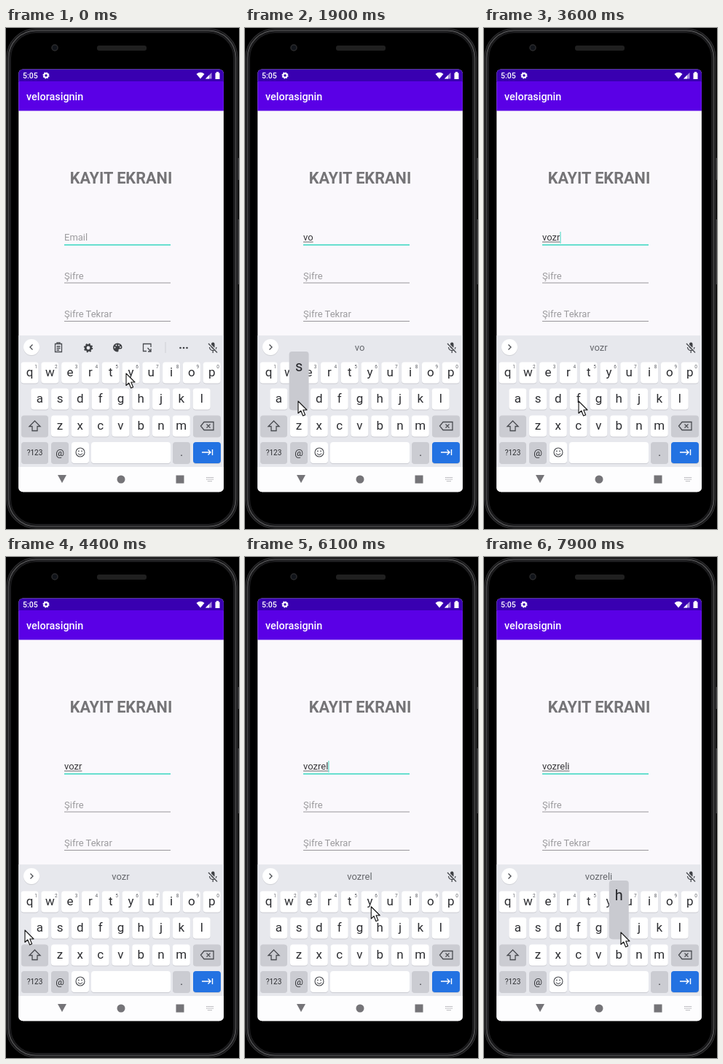
Recreate the animation shown at these times as an HTML page. Size 320 px wide and 686 px high, loop 8 s.

```html
<!DOCTYPE html>
<html lang="tr">
<head>
<meta charset="utf-8">
<title>Kayıt ekranı</title>
<style>
html, body { margin: 0; width: 100%; height: 100%; overflow: hidden; background: #000; }
svg { display: block; width: 100%; height: 100%; font-family: Roboto, "Noto Sans", sans-serif; }
.mid { text-anchor: middle; }
.hint { font-size: 13px; fill: #9c9b9e; }
.typed { font-size: 13px; fill: #38373a; }
.letter { font-size: 17px; fill: #2c2d31; }
.digit { font-size: 6.5px; fill: #606268; }
.offer { font-size: 13px; fill: #66686d; }
.line { fill: none; stroke: #4a4c51; stroke-width: 1.3; }
</style>
</head>
<body>
<svg viewBox="0 0 320 686">
  <defs>
    <clipPath id="screen"><rect x="17.300" y="56.600" width="281.600" height="578.600" rx="6"/></clipPath>
  </defs>

  <!-- Phone body -->
  <rect width="320" height="686" fill="#000"/>
  <path d="M319 178V208M319 262V351" stroke="#3a3a3c" stroke-width="2"/>
  <g fill="#000">
    <rect x="1" y="1" width="317" height="684" rx="40" stroke="#2c2c2e" stroke-width="1.500"/>
    <rect x="3.500" y="3.500" width="312" height="679" rx="37.500" stroke="#48484a" stroke-width="2"/>
    <rect x="6" y="6" width="307" height="674" rx="35" stroke="#1c1c1e" stroke-width="2"/>
  </g>
  <rect x="125" y="24" width="68" height="7" rx="3" fill="#202020"/>
  <circle cx="67" cy="27" r="4" fill="#11141a" stroke="#2b2b2d" stroke-width="1.500"/>

  <g clip-path="url(#screen)">
    <rect x="17" y="56" width="283" height="580" fill="#faf8fc"/>
    <rect x="17" y="56" width="283" height="18" fill="#3900b1"/>
    <rect x="17" y="73" width="283" height="40.400" fill="#5a00e6"/>
    <text x="23" y="69" font-size="10.500" font-weight="500" fill="#fff">5:05</text>
    <g id="statusGear"></g>
    <g fill="#fff">
      <path d="M261.500 63Q267 58.500 272.500 63L267 69.500Z"/>
      <path d="M274 69.500H282.500V61Z" fill-opacity=".55"/>
      <path d="M274 69.500H279V64.500Z"/>
      <path d="M287.500 61.500H289V60H292V61.500H293.500V70H287.500Z"/>
    </g>
    <text x="28" y="99" font-size="14.400" font-weight="500" fill="#fff">velorasignin</text>

    <text class="mid" x="158" y="213" font-size="21.700" font-weight="700" fill="#757477">KAYIT EKRANI</text>
    <text id="emailHint" class="hint" x="80" y="291">Email</text>
    <text id="entry" class="typed" x="80" y="291"></text>
    <rect id="entryLine" x="80" y="292.500" height="1" fill="#666"/>
    <rect id="caret" y="279" width="1.200" height="16" fill="#62dccb"/>
    <rect x="80" y="296" width="146" height="2" fill="#68dfcf"/>
    <text class="hint" x="80" y="343.500">Şifre</text>
    <rect x="80" y="348.500" width="146" height="1" fill="#99979b"/>
    <text class="hint" x="80" y="396">Şifre Tekrar</text>
    <rect x="80" y="401" width="146" height="1" fill="#99979b"/>

    <!-- Keyboard -->
    <rect x="17" y="421" width="283" height="180" fill="#e7e8ed"/>
    <circle cx="35" cy="438" r="11" fill="#cfd0d5"/>
    <circle cx="35" cy="437" r="11" fill="#fff"/>
    <path id="chevron" class="line"/>
    <g id="tools">
      <path class="line" d="M67.500 432.500H76.500V443.500H67.500ZM70 432V430.800H74V432M69.500 436H74.500M69.500 438.500H74.500M69.500 441H73"/>
      <g id="toolGear"></g>
      <path d="M153 431.500a6 6 0 1 0 0 12q2 0 1.500-2t1.500-2h1.500q2 0 2-2.500a6.300 5.500 0 0 0-6.500-5.500Z" fill="#3f4145"/>
      <g fill="#e7e8ed"><circle cx="149.500" cy="437.500" r="1"/><circle cx="151.500" cy="434.500" r="1"/><circle cx="155" cy="434.500" r="1"/><circle cx="157" cy="437" r="1"/></g>
      <path class="line" d="M199 437V432.500H188.500V442.500H193M194.500 438L199 443M195 443H199V439"/>
      <rect x="218.500" y="430" width="1" height="15" fill="#cfd0d5"/>
      <g fill="#3f4145"><circle cx="239.500" cy="438" r="1.300"/><circle cx="244" cy="438" r="1.300"/><circle cx="248.500" cy="438" r="1.300"/></g>
    </g>
    <rect x="282" y="430.500" width="4.500" height="8.500" rx="2.200" fill="#3f4145"/>
    <path class="line" d="M279.500 437Q280 441.500 284.200 441.500T289 437M284.200 441.500V445"/>
    <path d="M279 431.500L291 443.500" stroke="#e7e8ed" stroke-width="1.200"/>
    <path class="line" d="M278 432L290 444.500"/>
    <text id="centerOffer" class="offer mid" x="157.500" y="442"></text>
    <g id="splitOffers">
      <text id="leftOffer" class="offer mid" x="80" y="442"></text>
      <path d="M116.500 429V446M198.500 429V446" stroke="#cfd0d5"/>
      <g class="mid" fill="#55575c">
        <text x="157.500" y="432" font-size="9.800">voz48</text>
        <text x="157.500" y="444" font-size="8.800">@komu.test</text>
      </g>
    </g>
    <g id="keys"></g>
    <path class="line" d="M39.500 538L47 545.500H43V551.500H36V545.500H32Z"/>
    <path class="line" d="M267.500 545L272 539.500H285V550.500H272ZM275.500 542.500L280.500 547.500M280.500 542.500L275.500 547.500"/>
    <g class="line" style="stroke-width:1.100">
      <circle cx="102" cy="581" r="6"/>
      <path d="M98.800 582.500Q102 586.300 105.200 582.500"/>
    </g>
    <circle cx="99.900" cy="579.300" r=".9" fill="#4a4c51"/><circle cx="104.100" cy="579.300" r=".9" fill="#4a4c51"/>
    <path d="M269 581H281M277.500 577.500L281 581L277.500 584.500M283.500 577V585" fill="none" stroke="#fff" stroke-width="1.400"/>

    <rect x="17" y="601" width="283" height="35" fill="#fdfdfe"/>
    <g fill="#757478">
      <path d="M71 612H83L77 623Z"/>
      <circle cx="158" cy="618" r="5.500"/>
      <rect x="233.500" y="612.500" width="11" height="11"/>
    </g>
    <path d="M275 615.500H285M275 618H285M277 620.500H283" stroke="#aaa9ae" stroke-width="1.200" stroke-dasharray="1.500 .6"/>
    <g id="popup">
      <rect x="-13.500" y="-65" width="27" height="80" rx="4" fill="#c9cad0"/>
      <text id="popupLetter" class="mid" y="-38" font-size="20" fill="#242529"></text>
    </g>
  </g>
  <path id="pointer" d="M0 0V16.500L3.800 13L6.600 20L9.600 18.700L6.800 12H12Z" fill="#fff" stroke="#111" stroke-width="1.100" stroke-linejoin="round"/>
</svg>

<script>
const LOOP = 8000, STEP = 100, PRESS = 200, BLINK = 500;
const WORD = "vozreli";
const $ = id => document.getElementById(id);
const show = (el, on) => el.setAttribute("visibility", on ? "visible" : "hidden");

function gear(x, y, r, color) {
  const tooth = 2 * Math.PI * r / 16;
  return `<g fill="none" stroke="${color}">
    <circle cx="${x}" cy="${y}" r="${r * .72}" stroke-width="${r * .52}"/>
    <circle cx="${x}" cy="${y}" r="${r}" stroke-width="${r * .4}" stroke-dasharray="${tooth}"/></g>`;
}

function key(x, y, w, fill = "#fff", label = "", size = 17) {
  const box = (dy, color) =>
    `<rect x="${x - w / 2}" y="${y - 14.5 + dy}" width="${w}" height="29" rx="4" fill="${color}"/>`;
  return box(1, "#cbccd2") + box(0, fill) +
    `<text class="letter mid" x="${x}" y="${y + size * .31}" style="font-size:${size}px">${label}</text>`;
}

const GRAY = "#cbccd2", PITCH = 27.8;
const keyAt = {};
let keys = "";
[["qwertyuiop", 32.5, 472], ["asdfghjkl", 46.3, 508], ["zxcvbnm", 74, 545]].forEach(([row, left, y], r) => {
  [...row].forEach((c, i) => {
    const x = left + i * PITCH;
    keyAt[c] = [x, y];
    keys += key(x, y, 24, "#fff", c);
    if (!r) keys += `<text class="digit mid" x="${x + 8.5}" y="466">${(i + 1) % 10}</text>`;
  });
});
keys += key(39.5, 545, 37, GRAY) + key(276, 545, 38, GRAY) +
  key(39.5, 581.5, 37, GRAY, "?123", 10) + key(74, 581.5, 24, GRAY, "@", 13) +
  key(102, 581.5, 24) + key(171.5, 581.5, 109) +
  key(241, 581.5, 24, GRAY, ".", 14) + key(276, 581.5, 38, "#2372e2");
$("keys").innerHTML = keys;
$("statusGear").innerHTML = gear(55, 65, 3.8, "#fff");
$("toolGear").innerHTML = gear(113, 438, 5.2, "#3f4145");

// Key under the pointer and the time it is released
const presses = [["y", 400], ["b", 1000], ["s", 2000], ["f", 3600],
  ["a", 5100], ["t", 5800], ["i", 7200], ["h", 8000]];

// Pointer stops: time, x, y
const path = [[0, 165, 473], [200, 167, 477], [400, 167, 477], [800, 184, 538], [1100, 184, 538],
  [1800, 73, 511], [2000, 73, 511], [2700, 151, 453], [3400, 130, 511], [3600, 130, 511],
  [4400, 26, 511], [4900, 45, 511], [5100, 45, 511], [5500, 156, 481], [5800, 152, 479],
  [6700, 234, 478], [7200, 234, 478], [7800, 188, 514], [8000, 188, 514]];

function pointerAt(t) {
  const i = path.findIndex(p => p[0] > t);
  const [t0, x0, y0] = path[i - 1], [t1, x1, y1] = path[i];
  const u = (t - t0) / (t1 - t0), k = u * u * (3 - 2 * u);
  return [x0 + (x1 - x0) * k, y0 + (y1 - y0) * k];
}

let last = -1;
function draw(now) {
  requestAnimationFrame(draw);
  const t = Math.floor(now % LOOP / STEP) * STEP;
  if (t === last) return;
  last = t;

  const count = presses.filter(p => p[1] <= t).length;
  const text = WORD.slice(0, count);
  $("entry").textContent = text;
  const width = count ? $("entry").getComputedTextLength() : 0;
  $("entryLine").setAttribute("width", width);
  $("caret").setAttribute("x", 80 + width);
  const idle = count ? t - presses[count - 1][1] : BLINK;
  show($("caret"), Math.floor(idle / BLINK) % 2 === 0);

  show($("emailHint"), !count);
  show($("tools"), !count);
  $("chevron").setAttribute("d", count ? "M33.500 433.500L37 437L33.500 440.500" : "M36.500 433.500L33 437L36.500 440.500");
  show($("splitOffers"), count === 3);
  $("leftOffer").textContent = text;
  $("centerOffer").textContent = count === 3 ? "" : text;

  const held = presses.find(([, at]) => t >= at - PRESS && t < at);
  show($("popup"), !!held);
  if (held) {
    $("popup").setAttribute("transform", `translate(${keyAt[held[0]]})`);
    $("popupLetter").textContent = held[0];
  }
  $("pointer").setAttribute("transform", `translate(${pointerAt(t)})`);
}
draw(performance.now());
</script>
</body>
</html>
```
